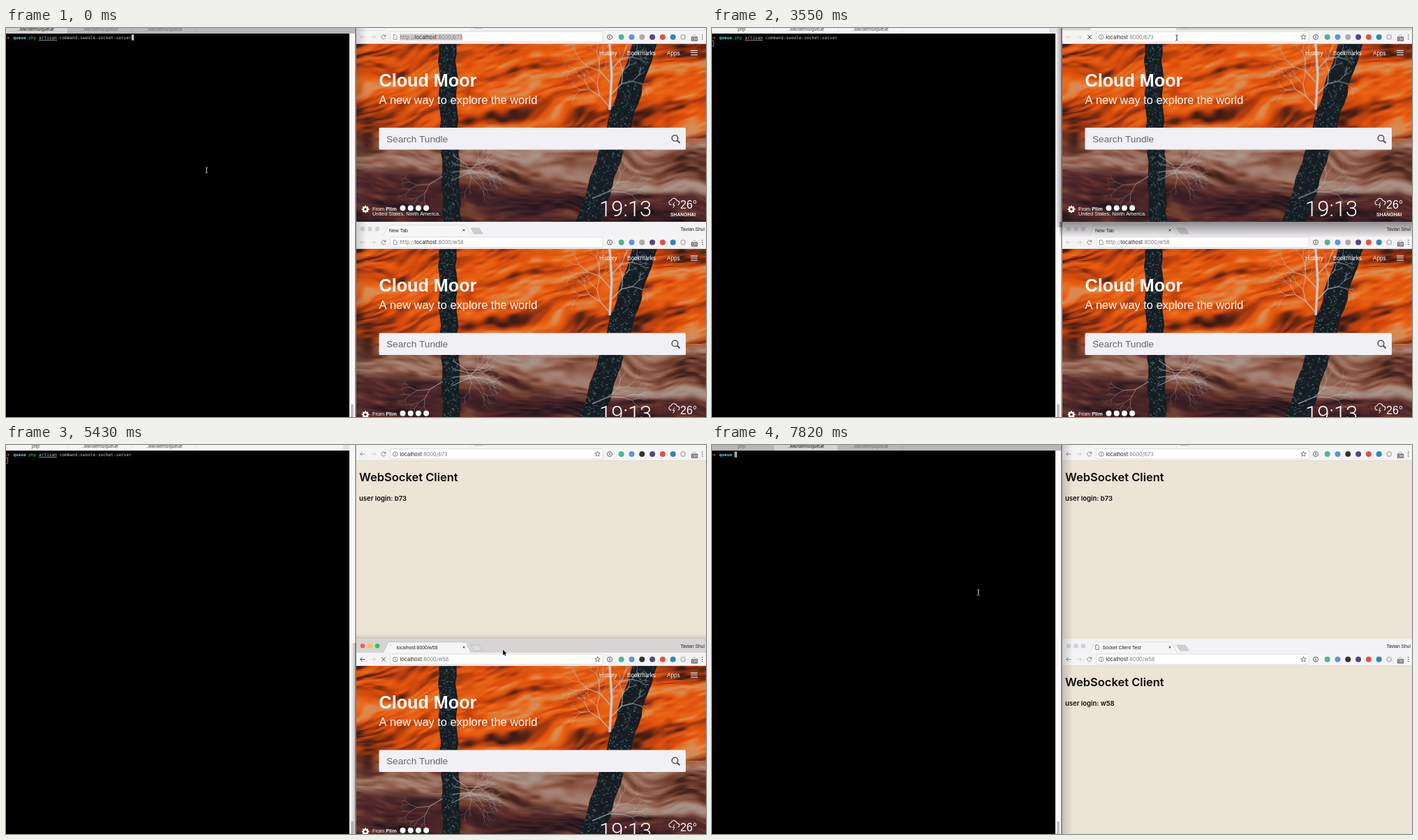
An HTML page with a canvas that plays this animation: 1003x558 px, repeating every 8 s.

```html
<!DOCTYPE html>
<html lang="en">
<head>
<meta charset="utf-8">
<title>Socket demo</title>
<style>
  html, body { margin: 0; width: 100%; height: 100%; overflow: hidden; background: #000; }
  canvas { display: block; }
</style>
</head>
<body>
<canvas id="stage" width="1003" height="558"></canvas>
<script>
const LOOP = 8000, STEP = 210, W = 1003, H = 558, TAU = Math.PI * 2;
const PAGE_X = 502, PAGE_Y = 22.5, LOWER = 294.5;
const SANS = '"Liberation Sans", Arial, sans-serif';
const UI = 'Inter, "Liberation Sans", sans-serif';
const MONO = '"DejaVu Sans Mono", "DejaVu Sans", monospace';
const AT = {
  run: 1050, focusTop: 2930, openTop: 3550, showTop: 3970, doneTop: 4450,
  focusLow: 4670, openLow: 4890, showLow: 5640, doneLow: 5880,
  focusTerm: 6560, newTab: 7610, prompt: 7820
};
const ctx = document.getElementById('stage').getContext('2d');
let c = ctx;

// drawing helpers
function rect(x, y, w, h, color) { c.fillStyle = color; c.fillRect(x, y, w, h); }
function text(s, x, y, font, color, align = 'left') {
  c.font = font; c.fillStyle = color; c.textAlign = align;
  c.fillText(s, x, y);
  return c.measureText(s).width;
}
function trace(pts, close) {
  c.beginPath();
  pts.forEach(([x, y], i) => i ? c.lineTo(x, y) : c.moveTo(x, y));
  if (close) c.closePath();
}
function poly(pts, color) { trace(pts, true); c.fillStyle = color; c.fill(); }
function line(pts, color, width = 1, close = false) {
  trace(pts, close); c.strokeStyle = color; c.lineWidth = width; c.stroke();
}
function cross(x, y, r, color) {
  line([[x - r, y - r], [x + r, y + r]], color);
  line([[x + r, y - r], [x - r, y + r]], color);
}
function disc(x, y, r, color) { c.beginPath(); c.arc(x, y, r, 0, TAU); c.fillStyle = color; c.fill(); }
function ring(x, y, r, color, width = 1, a = 0, b = TAU) {
  c.beginPath(); c.arc(x, y, r, a, b); c.strokeStyle = color; c.lineWidth = width; c.stroke();
}
function box(x, y, w, h, r, fill, stroke) {
  c.beginPath(); c.roundRect(x, y, w, h, r);
  c.fillStyle = fill; c.fill();
  if (stroke) { c.strokeStyle = stroke; c.lineWidth = 0.7; c.stroke(); }
}
// shadow fading from (x0, y0) to (x1, y1)
function shade(x, y, w, h, x0, y0, x1, y1, alpha) {
  const g = c.createLinearGradient(x0, y0, x1, y1);
  g.addColorStop(0, `rgba(40,34,40,${alpha})`);
  g.addColorStop(1, 'rgba(40,34,40,0)');
  rect(x, y, w, h, g);
}

// canyon backdrop, painted once
let seed = 11;
const rnd = () => (seed = (seed * 16807) % 2147483647) / 2147483647;
const mix = (a, b, k) => a + (b - a) * k;
const clamp = v => Math.max(0, Math.min(1, v));
function hash(x, y) {
  const v = Math.sin(x * 127.1 + y * 311.7) * 43758.5453;
  return v - Math.floor(v);
}
function noise(x, y) {
  const i = Math.floor(x), j = Math.floor(y), u = x - i, v = y - j;
  const sx = u * u * (3 - 2 * u), sy = v * v * (3 - 2 * v);
  return mix(mix(hash(i, j), hash(i + 1, j), sx), mix(hash(i, j + 1), hash(i + 1, j + 1), sx), sy);
}
const palette = s => s.split(' ').map(h => [0, 2, 4].map(i => parseInt(h.slice(i, i + 2), 16)));
const FLAME = palette('3c1c14 9c3610 d94d0c ea6414 d98a50');
const CLAY = palette('40221f 74402f 92604e a27c6c a89186');
const SHADE = palette('1c1218 3a1f24 55292a 74402f');
function ramp(colors, v) {
  const p = clamp(v) * (colors.length - 1.001), i = Math.floor(p);
  return colors[i].map((n, j) => mix(n, colors[i + 1][j], p - i));
}

function rocks(w, h) {
  for (let y = 0; y < h; y += 2) for (let x = 0; x < w; x += 2) {
    const warp = noise(x / 60, y / 40) * 30, dip = y < 135 ? 0.25 : -0.12;
    const bed = y + x * dip + warp;
    const v = 0.65 * noise(x / 80, bed / 13) + 0.35 * noise(x / 16 + 40, bed / 4);
    const tone = clamp((v - 0.5) * 1.5 + 0.52);
    const flame = ramp(FLAME, tone), clay = ramp(CLAY, tone), dark = ramp(SHADE, tone);
    const low = clamp((y - 120) / 25), base = clamp((y - 175 - x * 0.09 + warp * 0.4) / 12);
    const rgb = flame.map((n, i) => Math.round(mix(mix(n, clay[i], low), dark[i], base)));
    rect(x, y, 2, 2, `rgb(${rgb})`);
  }
}
// slanted trunk with flecked bark
function trunk(top, foot, width, h) {
  for (let y = 0; y < h; y += 2) {
    const x = mix(top, foot, y / h) + noise(y / 12, top) * 3;
    rect(x, y, width, 2, '#151d22');
    for (let i = 0; i < 4; i++)
      rect(x + rnd() * (width - 3), y, 1 + rnd() * 2, 1 + rnd() * 2, `hsl(196 ${15 + rnd() * 15}% ${8 + rnd() * 26}%)`);
  }
}
function twig(x, y, angle, len, width) {
  if (len < 5) return;
  const x2 = x + Math.cos(angle) * len, y2 = y + Math.sin(angle) * len;
  line([[x, y], [x2, y2]], 'rgba(186,200,210,0.66)', width);
  for (const side of [-1, 1])
    twig(x2, y2, angle + side * (0.2 + rnd() * 0.5), len * (0.6 + rnd() * 0.25), width * 0.75);
}
function makePhoto() {
  const cv = document.createElement('canvas'), w = cv.width = 501, h = cv.height = 256;
  c = cv.getContext('2d');
  rocks(w, h);
  trunk(116, 123, 25, h);
  trunk(393, 314, 35, h);
  line([[363, 0], [366, 45], [363, 95]], 'rgba(200,210,216,0.9)', 3.5);
  for (let i = 0; i < 4; i++) {
    twig(364, 92 - i * 18, i % 2 ? -0.8 : -2.3, 23, 1.8);
    twig(138, 160 + i * 12, 0.6 - i * 0.35, 24, 1.1);
  }
  twig(124, 190, 2.6, 22, 1.1);
  twig(338, 222, -0.4, 26, 1.5);
  c = ctx;
  return cv;
}
const photo = makePhoto();

// start page, in coordinates of the upper window
function startPage() {
  c.drawImage(photo, PAGE_X, PAGE_Y);
  const white = '#fff', nav = '8.2px ' + SANS, small = '7.35px ' + SANS;
  text('History', 850, 38.5, nav, white);
  text('Bookmarks', 890, 38.5, nav, white);
  text('Apps', 947, 38.5, nav, white);
  for (let i = 0; i < 3; i++) rect(981, 32 + i * 3, 10, 1, white);
  text('Cloud Moor', 534.5, 83.5, 'bold 25.2px ' + SANS, white);
  text('A new way to explore the world', 534.5, 108.5, '16.4px ' + SANS, white);
  box(534.5, 143, 439.5, 31.5, 1.5, '#f1f0f5');
  text('Search Tundle', 545, 163.7, '13.65px ' + SANS, '#666');
  ring(958.5, 158, 4.3, '#555', 1.6);
  line([[961.7, 161.2], [965.5, 165]], '#555', 2.2);

  for (let i = 0; i < 4; i++) {
    const a = i * Math.PI / 4, x = Math.cos(a) * 5.3, y = Math.sin(a) * 5.3;
    line([[515 - x, 260 - y], [515 + x, 260 + y]], white, 2);
  }
  ring(515, 260, 3, white, 2.2);
  disc(515, 260, 1.8, '#4a2a2d');
  const w = text('From ', 525, 261.7, small, white);
  text('Plim', 525 + w, 261.7, 'bold ' + small, white);
  for (let i = 0; i < 4; i++) disc(568.5 + i * 11.2, 258.3, 4, white);
  text('United States, North America.', 525, 269, small, white);
  text('19:13', 850, 269.5, '300 31px Roboto, ' + SANS, white);
  text('26°', 966, 259, '16px ' + SANS, white);
  c.beginPath();
  c.arc(953, 250.5, 3, 1.4, 4.6); c.arc(957, 248.5, 4.2, 3.6, 6); c.arc(962, 251, 2.8, 5, 7.6);
  c.strokeStyle = white; c.lineWidth = 1.1; c.stroke();
  line([[958, 250], [955.5, 254], [958, 254], [956, 258]], white, 0.9);
  text('SHANGHAI', 952, 270, 'bold 6.75px ' + SANS, white);
}

function clientPage(user) {
  rect(PAGE_X, PAGE_Y, 501, 256, '#ece5d6');
  text('WebSocket Client', 506, 51.5, '600 16.5px ' + UI, '#0c0c0c');
  text('user login: ' + user, 506, 79.5, '600 9.5px ' + UI, '#0c0c0c');
}

function sheet(x, y, color) {
  line([[x - 2.3, y - 3.3], [x + 0.6, y - 3.3], [x + 2.4, y - 1.4], [x + 2.4, y + 3.3], [x - 2.3, y + 3.3]], color, 0.8, true);
}

function tabStrip(b, t) {
  rect(PAGE_X, -16.5, 501, 20, b.active ? '#d7d4d4' : '#f3f2f4');
  const tab = [[541, 3.6], [548, -11.3], [659, -11.3], [666, 3.6]];
  line(tab, b.active ? '#b4b0b0' : '#c9c7ca', 0.9);
  poly(tab, '#f6f6f6');
  ['#fc5b54', '#fdbd3e', '#33c748'].forEach((v, i) => disc(511 + i * 10.5, -6.2, 3.3, b.active ? v : '#d3d1d4'));
  const plus = [[666, -7.5], [678, -7.5], [683, 0.5], [671, 0.5]];
  poly(plus, b.active ? '#dedbdb' : '#d0ced1');
  line(plus, '#bcb8bb', 0.7, true);
  text(b.title, b.icon ? 559.5 : 549, -2, '6.9px ' + SANS, '#222');
  if (b.icon === 'sheet') sheet(552, -4.5, '#666');
  if (b.icon === 'spin') {
    const k = clamp((t - AT.showLow + STEP) / STEP);
    ring(552, -4, 3.8, '#3f7fe8', 1.2, 4.4 - k * 4, 4.6 - k * 1.2);
  }
  cross(656, -4.5, 1.5, '#555');
  text('Tavian Shui', 1001, -3.5, '6.7px ' + SANS, '#222', 'right');
}

function navArrow(x, dir, color) {
  const tip = x + 3.5 * dir;
  line([[x - 3.5 * dir, 13], [tip, 13]], color);
  line([[tip - 3.1 * dir, 10], [tip, 13], [tip - 3.1 * dir, 16]], color);
}

function star(x, y, r) {
  const pts = Array.from({ length: 10 }, (_, i) => {
    const a = i * Math.PI / 5 - Math.PI / 2, d = i % 2 ? r * 0.44 : r;
    return [x + Math.cos(a) * d, y + Math.sin(a) * d];
  });
  line(pts, '#555', 0.8, true);
}

function address(b) {
  box(550.5, 5.5, 305, 14.5, 1.5, '#fff', '#d3d2d4');
  const font = '7.4px ' + UI;
  let x = 564.5;
  if (b.visited) {
    ring(557.7, 13, 3.3, '#666', 0.8);
    rect(557.3, 12.4, 0.9, 2.7, '#666');
    rect(557.3, 10.9, 0.9, 0.9, '#666');
    star(847.5, 13, 3.9);
  } else {
    sheet(557.7, 13, '#777');
    c.font = font;
    if (b.mark) rect(564, 8, c.measureText('http://localhost:8000/' + b.user).width + 1, 10, b.mark);
    x += text('http://', x, 15.7, font, '#777');
  }
  x += text('localhost', x, 15.7, font, '#222');
  text(':8000/' + b.user, x, 15.7, font, '#777');
}

function toolbar(b) {
  rect(PAGE_X, 3.5, 501, 19, '#f4f4f5');
  rect(PAGE_X, 22, 501, 0.7, '#c8c6c6');
  const faint = '#cfcfd1', dark = '#555', mid = b.active ? dark : '#8c8c8e';
  navArrow(511, -1, b.ready ? mid : faint);
  navArrow(526, 1, faint);
  if (b.loading) cross(541, 13, 3, dark);
  else {
    ring(540.8, 13, 3, mid, 1, 0.5, 5.5);
    poly([[544.3, 9.3], [544.3, 12.6], [541, 12.6]], mid);
  }
  address(b);

  ring(865, 13, 3.5, dark, 0.9);
  rect(864.5, 11, 1, 4, dark);
  ['#4fb59b', '#5b94e6', b.ready ? '#333' : '#aaa', '#5a4386', '#e4503f', '#2f86b8']
    .forEach((v, i) => disc(881.7 + i * 14.8, 13, 4, v));
  ring(970.2, 13, 3.2, '#b9b9bb', 1.6);
  line([[982.5, 13], [986.3, 9.5], [990, 13]], '#999', 0.8);
  box(981.8, 12.5, 9.4, 6.5, 1, '#77777a');
  text('Off', 986.5, 17.6, '5px ' + SANS, '#fff', 'center');
  for (let i = -1; i < 2; i++) disc(997.7, 13 + i * 3, 0.8, dark);
}

function browser(b, dy, t) {
  c.save();
  c.beginPath(); c.rect(PAGE_X, dy ? 278 : 0, 501, dy ? 280 : 278); c.clip();
  c.translate(0, dy);
  tabStrip(b, t);
  toolbar(b);
  if (b.loaded) clientPage(b.user); else startPage();
  if (b.waiting) {
    box(501.5, 268.7, 168.5, 10, 1, '#f4f4f3', '#b5b3b0');
    text('正在等待 query.yahooapis.com 的响应...', 504, 275.7, '5.7px "Noto Sans CJK SC", "Noto Sans CJK", sans-serif', '#222');
  }
  c.restore();
}

function terminalTabs(focused, running, current) {
  rect(0, 0, 500, 8, focused ? '#b9b6b9' : '#f6f4f7');
  if (!focused) rect(483, 0, 9, 8, '#e2e0e4');
  for (let i = 0; i < 3; i++) {
    const on = focused && i === current, x = 88.5 + i * 92;
    if (on) rect(x - 92, 0, 92, 8, '#d4d2d4');
    rect(x, 0, 0.7, 8, focused ? '#a29fa2' : '#dcdadd');
    text(running && !i ? 'php' : '..ww/demo/queue', x - 46, 4, '6.7px ' + SANS, on ? '#111' : focused ? '#6d6a6d' : '#444', 'center');
  }
}

function terminal(t, focused) {
  const second = t >= AT.newTab, running = t >= AT.run, grey = '#c4c4c4';
  rect(0, 8, 492, 550, '#000');
  rect(492, 8, 8, 550, '#fafafa');
  box(494, 539.5, 4, 22, 1.5, '#c1c1c1');
  rect(500, 0, 2, H, '#a89fa3');
  terminalTabs(focused, running, second ? 1 : 0);

  const cell = 3.69, font = '6.13px ' + MONO, col = n => n * cell - 0.9;
  const prompt = !second || t >= AT.prompt;
  if (prompt) {
    text('➜', 0, 16, 'bold 6.2px "DejaVu Sans", ' + MONO, '#f2553d');
    text('queue', col(3), 16, 'bold ' + font, '#45dfe4');
  }
  if (second) {
    rect(prompt ? col(9) : 0, 9.3, 3.5, 8.4, '#adadad');
    return;
  }
  text('php', col(9), 16, font, '#35d23b');
  text('artisan', col(13), 16, font, grey);
  rect(col(13), 17, cell * 7, 0.7, grey);
  text('command:swoole-socket-server', col(21), 16, font, grey);
  if (!running) rect(col(49), 9.3, 3.4, 8.4, grey);
  else if (focused) rect(0, 18, 2.6, 8.3, '#b5b5b5');
  else { c.strokeStyle = '#a8a8a8'; c.lineWidth = 0.7; c.strokeRect(-0.5, 18.3, 3, 7.8); }
}

// pointer moves: start, number of steps, goal
const moves = [
  [1650, 2, 678.5, 45.5], [2270, 3, 666, 14], [AT.showTop, 1, 692, 225.5], [4180, 2, 663, 308],
  [5110, 1, 712, 293.5], [6120, 3, 400, 224], [6800, 3, 381.5, 211.5]
];
function pointer(t) {
  let x = 287.5, y = 204;
  for (const [start, steps, gx, gy] of moves) {
    if (t < start) break;
    const k = Math.min(1, (Math.floor((t - start) / STEP) + 1) / steps);
    x = mix(x, gx, k); y = mix(y, gy, k);
  }
  const inTerminal = x < 492, inToolbar = y % LOWER < 22;
  if (inTerminal || inToolbar) {
    const color = inTerminal ? '#c9c9c9' : '#222';
    line([[x, y - 3.5], [x, y + 3.5]], color);
    for (const s of [-1, 1]) line([[x - 1.8, y + s * 4.2], [x, y + s * 3.4], [x + 1.8, y + s * 4.2]], color, 0.8);
    return;
  }
  const pts = [[0, 0], [0, 8], [1.8, 6.4], [3, 9], [4.3, 8.4], [3.1, 5.9], [5.6, 5.7]].map(p => [x + p[0], y + p[1]]);
  line(pts, '#fff', 1.2, true);
  poly(pts, '#111');
}

function draw(t) {
  const focus = t < AT.focusTop || t >= AT.focusTerm ? 'term' : t < AT.focusLow ? 'top' : 'low';
  const blue = '#b5d5fb', done = 'Socket Client Test', fresh = t < AT.openLow;
  const busy = !fresh && t < AT.doneLow;
  const top = {
    user: 'b73', active: focus === 'top', title: t < AT.showTop ? 'New Tab' : done,
    mark: t < AT.focusTop ? '#d2d2d4' : blue, visited: t >= AT.openTop,
    loading: t >= AT.openTop && t < AT.doneTop, waiting: t >= AT.showTop && t < AT.doneTop,
    ready: t >= AT.showTop, loaded: t >= AT.showTop
  };
  const low = {
    user: 'w58', active: focus === 'low',
    title: fresh ? 'New Tab' : busy ? 'localhost:8000/w58' : done,
    icon: fresh ? '' : busy ? 'spin' : 'sheet',
    mark: t >= AT.focusLow && blue, visited: !fresh, loading: busy, ready: !fresh, loaded: t >= AT.showLow
  };
  terminal(t, focus === 'term');
  browser(low, LOWER, t);
  browser(top, 0, t);
  if (focus === 'top') {
    shade(492, 0, 10, 286, 502, 0, 491, 0, 0.4);
    shade(498, 278, 505, 22, 0, 278, 0, 301, 0.5);
  } else if (focus === 'low') {
    shade(494, 284, 8, 274, 502, 0, 494, 0, 0.35);
    shade(500, 271, 503, 7, 0, 278, 0, 271, 0.15);
  } else {
    shade(500, 0, 17, H, 500, 0, 517, 0, 0.22);
  }
  pointer(t);
}

function tick() {
  draw(performance.now() % LOOP);
  requestAnimationFrame(tick);
}
tick();
</script>
</body>
</html>
```
